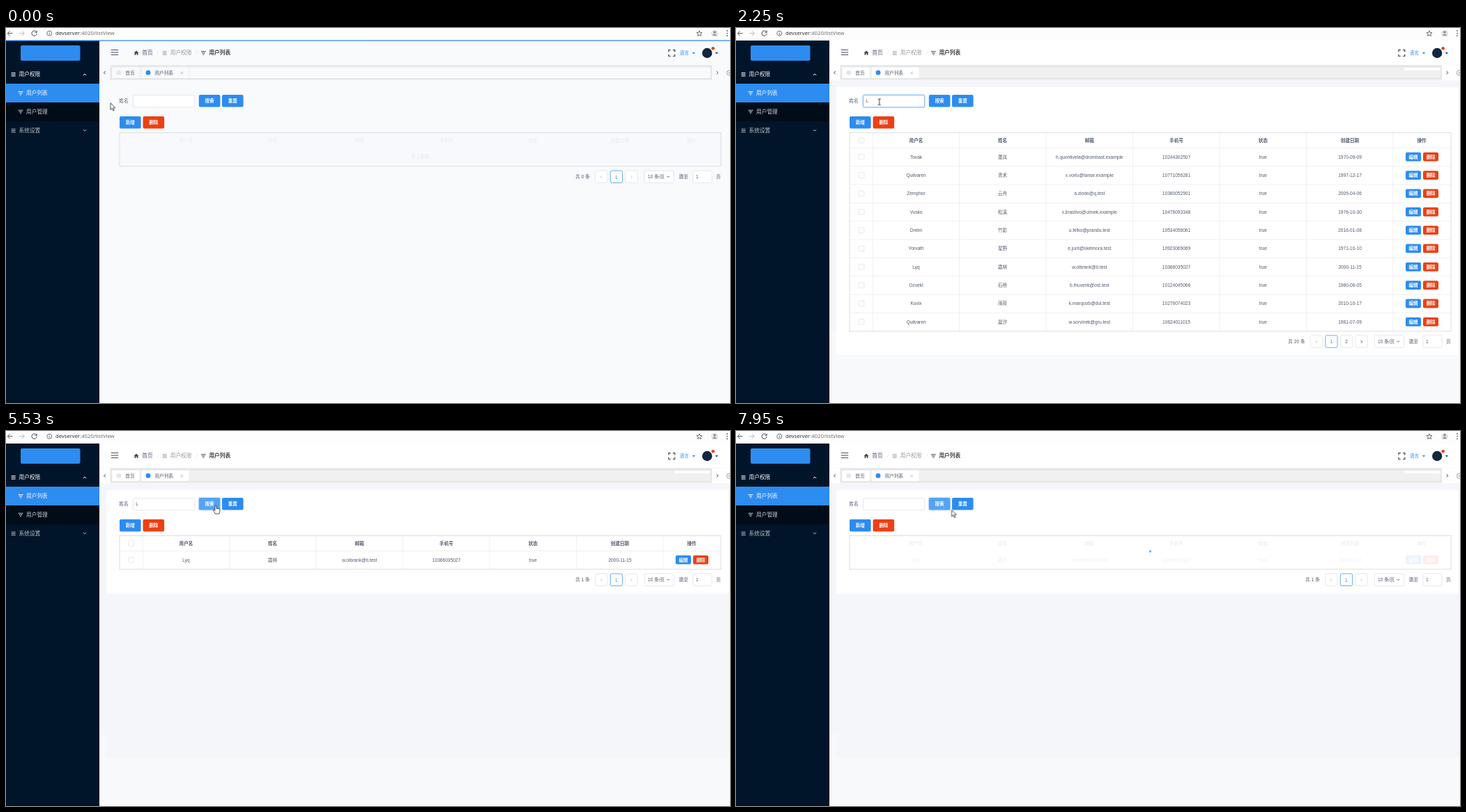
Write an HTML page that moves like this. It is 1039 by 539 pixels and loops after 8 s.

```html
<!DOCTYPE html>
<html lang="zh-CN">
<head>
<meta charset="utf-8">
<title>用户列表</title>
<style>
html, body { margin: 0; width: 100%; height: 100%; overflow: hidden; background: #fff; }
svg { display: block; width: 100%; height: 100%; }
text { font: 6.6px "Liberation Sans", "Noto Sans CJK SC", "Noto Sans CJK", sans-serif; fill: #515a6e; }
.mid { text-anchor: middle; }
.bold { font-weight: 700; }
.nav { font-size: 7.7px; }
.url { font: 7.7px "Open Sans", sans-serif; fill: #666; }
.pale { fill: #fff; }
.grid { fill: none; stroke: #e8eaec; stroke-width: .7; }
.box { fill: #fff; stroke: #dcdee2; stroke-width: .7; }
.frame { fill: none; stroke: #d7dade; stroke-width: .9; }
.ring { fill: none; stroke: #2d8cf0; stroke-opacity: .2; stroke-width: 1.2; }

/* every keyframe set below spans the same 8 s loop */
.empty, .full, .single, .typed, .caret1, .caret2, .patch, .strip, .dot1, .dot2, .arrow, .beam, .hand {
  animation: 8s step-end infinite;
}
.empty { animation-name: empty; }
.full { animation-name: full; }
.single { animation-name: single; }
.typed { animation-name: typed; }
.caret1 { animation-name: caret1; }
.caret2 { animation-name: caret2; }
.patch { animation-name: patch; }
.strip { animation-name: strip; }
.dot1 { animation-name: dot1; }
.dot2 { animation-name: dot2; }
.arrow { animation-name: arrow; }
.beam { animation-name: beam; }
.hand { animation-name: hand; }
@keyframes empty { 0% { visibility: visible } 3.375%, 100% { visibility: hidden } }
@keyframes full { 0%, 58%, 100% { visibility: hidden } 3.375% { visibility: visible } }
@keyframes single { 0% { visibility: hidden } 58%, 100% { visibility: visible } }
@keyframes typed { 0%, 83%, 100% { visibility: hidden } 21.125% { visibility: visible } }
@keyframes caret1 { 0%, 16.5%, 100% { visibility: hidden } 10.125% { visibility: visible } }
@keyframes caret2 { 0%, 28.125%, 39.875%, 100% { visibility: hidden } 21.125%, 34.75% { visibility: visible } }
@keyframes patch { 0%, 6.5%, 100% { visibility: hidden } 3.375% { visibility: visible } }
@keyframes strip { 0% { visibility: hidden } 3.375%, 100% { visibility: visible } }
@keyframes dot1 { 0%, 25%, 100% { visibility: hidden } 3.375% { visibility: visible } }
@keyframes dot2 { 0%, 58%, 100% { visibility: hidden } 25% { visibility: visible } }
@keyframes arrow {
  0%, 32.8%, 70.7%, 98.6%, 100% { visibility: visible }
  2.4%, 36.1%, 71.4% { visibility: hidden }
}
@keyframes beam { 0%, 32.8%, 100% { visibility: hidden } 2.4% { visibility: visible } }
@keyframes hand {
  0%, 70.7%, 98.6%, 100% { visibility: hidden }
  36.1%, 71.4% { visibility: visible }
}

.cursor, .mask, .bar, .search, .reset, .input, .ring { animation: 8s linear infinite; }
.cursor { animation-name: move; }
.mask { animation-name: mask; }
.bar { animation-name: bar; }
.search { animation-name: search; }
.reset { animation-name: reset; }
.input { animation-name: input; }
.ring.a { animation-name: inputRing; }
.ring.b { animation-name: searchRing; }
.ring.c { animation-name: resetRing; }
@keyframes move {
  0%, .6% { transform: translate(150px, 107.7px) }
  3.75% { transform: translate(205px, 105.7px) }
  28% { transform: translate(205px, 105.7px) }
  28.125%, 30% { transform: translate(205.7px, 106.2px) }
  32.5% { transform: translate(262px, 112px) }
  35% { transform: translate(311px, 117px) }
  37.875%, 58% { transform: translate(297px, 107.5px) }
  61.25%, 69.125% { transform: translate(301px, 107px); animation-timing-function: ease-in-out }
  78.5%, 86.25% { transform: translate(337.5px, 110px) }
  91.625%, 96.25% { transform: translate(298px, 109px) }
  99.1%, 100% { transform: translate(309.5px, 113.3px) }
}
@keyframes mask {
  0%, 3.375%, 47%, 58%, 98.25%, 100% { opacity: 1 }
  5.875%, 44.5%, 60.5%, 95.75% { opacity: 0 }
}
@keyframes bar { 0%, 1.125% { opacity: .8 } 3.375%, 100% { opacity: 0 } }
@keyframes search {
  0%, 36.1%, 73.2%, 90% { fill: #2d8cf0 }
  38.6%, 39.9%, 46.5%, 70.7%, 92%, 92.4%, 97.5%, 100% { fill: #57a3f3 }
  41.5%, 44.5%, 94%, 95.7% { fill: #2b85e4 }
}
@keyframes reset {
  0%, 71.4%, 92%, 100% { fill: #2d8cf0 }
  73.9%, 81%, 85.5%, 90% { fill: #57a3f3 }
  82.9%, 83.3% { fill: #2b85e4 }
}
@keyframes input {
  0%, 2.4%, 42.4%, 100% { stroke: #dcdee2 }
  4.6%, 39.9% { stroke: #57a3f3 }
}
@keyframes inputRing { 0%, 10%, 42.4%, 100% { opacity: 0 } 12.25%, 39.9% { opacity: 1 } }
@keyframes searchRing { 0%, 39.9%, 81.5%, 92.4% { opacity: 0 } 42.4%, 81%, 94.9%, 100% { opacity: 1 } }
@keyframes resetRing { 0%, 82%, 94.5%, 100% { opacity: 0 } 84.5%, 92.4% { opacity: 1 } }

.spin { fill: #2d8cf0; transform-box: fill-box; transform-origin: center; animation: bounce 1s ease-in-out infinite; }
@keyframes bounce { from { transform: scale(0) } to { transform: scale(1); opacity: 0 } }
</style>
</head>
<body>
<svg id="stage" viewBox="0 0 1039 539"></svg>
<script>
const BLUE = '#2d8cf0', RED = '#ed4014';
const LEFT = 163, TOP = 150.4, WIDTH = 863, HEAD = 22, ROW = 26.35;
const edges = [196.5, 320.5, 445, 569.5, 694, 818.5, 943];
const centers = [258.5, 382.5, 507.3, 632, 756.3, 881, 984];
const titles = ['用户名', '姓名', '邮箱', '手机号', '状态', '创建日期', '操作'];
const users = `Tovak|墨岚|h.quontivela@drombast.example|10244302507|1970-09-09
Quilvaren|青禾|x.vorlu@tanse.example|10771056281|1997-12-17
Zemphor|云舟|a.zindo@q.test|10380052901|2009-04-06
Vusko|松溪|x.brastivo@ulmek.example|10476093348|1976-10-30
Drelm|竹影|u.felko@prandu.test|10534058061|2016-01-08
Yorvath|星野|e.junt@skelmora.test|10923069069|1971-10-10
Lyq|霜林|w.olbrank@ti.test|10366035027|2000-11-15
Ozvekt|石桥|b.thuvenk@ost.test|10124045068|1980-06-05
Kuvix|雨荷|k.marquob@dul.test|10276074023|2010-10-17
Quilvaren|晨汐|w.sorvinek@gru.test|10624011015|1981-07-09`
  .split('\n').map(line => line.split('|'));

// markup helpers; text is placed by its vertical middle
const rect = (x, y, w, h, fill, r = 0, cls = '') =>
  `<rect x="${x}" y="${y}" width="${w}" height="${h}" rx="${r}" ${fill ? `fill="${fill}"` : ''} class="${cls}"/>`;
const text = (x, y, s, cls = '', fill = '') =>
  `<text x="${x}" y="${y + (cls.includes('nav') ? 2.8 : 2.4)}" class="${cls}" ${fill ? `style="fill:${fill}"` : ''}>${s}</text>`;
const path = (d, stroke = '#515a6e', w = .9, fill = 'none') =>
  `<path d="${d}" fill="${fill}" stroke="${stroke}" stroke-width="${w}"/>`;
const circle = (x, y, r, fill, extra = '') => `<circle cx="${x}" cy="${y}" r="${r}" fill="${fill}" ${extra}/>`;
const group = (cls, ...parts) => `<g class="${cls}">${parts.join('')}</g>`;
const button = (x, y, w, h, label, fill, cls = '') =>
  rect(x, y, w, h, fill, 2, cls) + text(x + w / 2, y + h / 2, label, 'mid bold pale');
const bars = (x, y, widths, color) =>
  widths.map((w, i) => path(`M${x - w / 2} ${y + (i - 1) * 2.2}h${w}`, color, 1)).join('');
const menuIcon = (x, y, c) => bars(x, y, [6, 6, 6], c);
const filterIcon = (x, y, c) => bars(x, y, [7, 4.6, 2], c);
// chevron pointing along (dx, dy)
const chevron = (x, y, dx, dy, c, s = 2.2) =>
  path(`M${x - dx * s / 2 - dy * s} ${y - dy * s / 2 - dx * s}L${x + dx * s / 2} ${y + dy * s / 2}L${x - dx * s / 2 + dy * s} ${y - dy * s / 2 + dx * s}`, c, 1);
const caretDown = (x, y, c) => path(`M${x - 2.3} ${y - 1}h4.6l-2.3 2.4z`, 'none', 0, c);

function browser() {
  return rect(0, 0, 1039, 18, '#fdfdfd') +
    path('M9.5 7.7H2.3M5.6 4.3L2.2 7.7L5.6 11.1', '#555', 1) +
    path('M19 7.7H26.2M22.9 4.3L26.3 7.7L22.9 11.1', '#bbb', 1) +
    path('M43.5 5.5A3.6 3.6 0 1 0 44.2 8M44.2 3.8V6.4H41.6', '#444', 1) +
    circle(62.3, 7.7, 3.5, 'none', 'stroke="#555" stroke-width=".8"') +
    path('M62.3 7.2V9.7M62.3 5.5V6.4', '#555', .9) +
    '<text x="71" y="10.4" class="url"><tspan fill="#222">devserver</tspan>:4020/listView</text>' +
    path('M995 3.9l1.1 2.6 2.8.2-2.1 1.9.6 2.8-2.4-1.5-2.4 1.5.6-2.8-2.1-1.9 2.8-.2z', '#444', .8) +
    circle(1017, 7.6, 5.2, '#e4e6e8') + circle(1017, 6, 1.8, '#888') +
    path('M1013.6 10.8q3.4-4 6.8 0z', 'none', 0, '#888') +
    [4, 7.6, 11.2].map(y => circle(1035, y, .9, '#555')).join('');
}

function sidebar() {
  return rect(0, 18, 134, 521, '#001529') + rect(21, 25, 85.5, 22, BLUE, 2) +
    menuIcon(10.6, 66.8, '#fff') + text(18.5, 66.5, '用户权限', 'nav', '#fff') + chevron(113, 67, 0, -1, '#fff') +
    rect(0, 80, 134, 27, BLUE) + filterIcon(21, 93.7, '#fff') + text(29, 93.4, '用户列表', 'nav', '#fff') +
    rect(0, 107, 134, 27, '#000c17') + filterIcon(21, 120.5, '#ccd0d4') + text(29, 120.2, '用户管理', 'nav', '#ccd0d4') +
    menuIcon(10.6, 147.5, '#b3b9bf') + text(18.5, 147.2, '系统设置', 'nav', '#b3b9bf') + chevron(113, 147, 0, 1, '#b3b9bf');
}

function surfaces() {
  return rect(134, 18, 905, 521, '#f8f9fb') + rect(134, 75, 905, 361, '#f5f6f9') +
    rect(144, 436, 895, 34, '#f5f6f9') + rect(134, 18, 905, 57, '#fff') + path('M134 53.3H1039', '#eef0f2', .6) +
    group('full', rect(144, 85, 893, 385, '#fff', 3)) + group('single', rect(144, 85, 893, 149, '#fff', 3)) +
    group('patch', rect(959, 75, 67, 20, '#fcfcfd')) + group('empty', rect(134, 18, 905, 521, '#f8fafc'));
}

function header() {
  return [31.5, 35, 38.5].map(y => path(`M150.7 ${y}h10.5`, '#515a6e', 1.1)).join('') +
    path('M183.6 36L187 32.6L190.4 36H189.4V39H187.8V36.8H186.2V39H184.6V36z', 'none', 0, '#444') +
    text(195.3, 35.4, '首页', 'nav') + text(217, 35.4, '/', 'nav', '#dcdee2') +
    menuIcon(227.7, 36, '#999') + text(235.7, 35.4, '用户权限', 'nav', '#999') + text(273, 35.4, '/', 'nav', '#dcdee2') +
    filterIcon(283.3, 36, '#444') + text(291.4, 35.4, '用户列表', 'nav bold', '#444') +
    path('M951 34.5V31.7H953.8M957 31.7H959.8V34.5M959.8 37.7V40.5H957M953.8 40.5H951V37.7', '#444', 1.2) +
    text(967, 35.4, '语言', '', BLUE) + caretDown(987, 36, BLUE) +
    circle(1006.2, 36, 7.2, '#12263f') + circle(1014.7, 29.2, 2.3, RED) + caretDown(1019.8, 36, '#2b4a6f');
}

function tabs() {
  return rect(149.5, 53.5, 863.5, 21, '#e5e6e7') + rect(152, 56.5, 859, 15.5, '#f0f0ef') +
    rect(152.5, 56.5, 39, 15.5, '#fff', 1) + rect(195, 56.5, 67.5, 15.5, '#fff', 1) +
    group('patch', rect(959, 57, 52, 15, '#fafafa')) + group('strip', rect(959, 57, 52, 4, '#fdfdfd')) +
    group('empty', rect(152, 56.5, 859, 15.5, '#f8fafc'), path('M192 56.5V72M194.3 56.5V72M263 56.5V72', '#e5e7ea', .8)) +
    circle(161.8, 64.2, 3.4, '#e4e6e8') + text(171.3, 64.2, '首页') +
    circle(204, 64.2, 3.4, BLUE) + text(213.5, 64.2, '用户列表') +
    path('M250.4 62.8l3.6 3.6m0-3.6l-3.6 3.6', '#aaa', .7) +
    chevron(141.6, 64.2, -1, 0, '#444') + chevron(1020.8, 64.2, 1, 0, '#444') +
    circle(1038, 64.5, 3.6, 'none', 'stroke="#777" stroke-width=".7"') + path('M1036.8 63.3l2.4 2.4m0-2.4l-2.4 2.4', '#777', .7);
}

function form() {
  return text(162.3, 104.5, '姓名') +
    rect(182.5, 96.6, 88, 17.2, '', 2, 'box input') + rect(181.6, 95.7, 89.8, 19, '', 2.6, 'ring a') +
    group('typed', text(186.3, 105, 'L')) +
    group('caret1', rect(186, 101, .8, 8, '#333')) + group('caret2', rect(190.2, 101, .8, 8, '#333')) +
    button(276.8, 96, 30.6, 17.6, '搜索', BLUE, 'search') + rect(276.2, 95.4, 31.8, 18.8, '', 2.5, 'ring b') +
    button(310, 96, 30.6, 17.6, '重置', BLUE, 'reset') + rect(309.4, 95.4, 31.8, 18.8, '', 2.5, 'ring c') +
    button(163, 127, 30.6, 17.6, '新增', BLUE) + button(196.5, 127, 30.6, 17.6, '删除', RED);
}

const checkbox = y => rect(176.2, y - 3.8, 7.6, 7.6, '', 1, 'box');

function row(user, i) {
  const y = TOP + HEAD + ROW * (i + .5) - .4;
  const [name, alias, mail, phone, date] = user;
  return checkbox(y) +
    [name, alias, mail, phone, 'true', date].map((s, c) => text(centers[c], y, s, 'mid')).join('') +
    button(961, y - 6.4, 22, 12.8, '编辑', BLUE) + button(986, y - 6.4, 22, 12.8, '删除', RED) +
    path(`M${LEFT} ${TOP + HEAD + ROW * i}h${WIDTH}`, '#e8eaec', .7);
}

const tableHeight = count => HEAD + ROW * count;

function table(list) {
  const grid = edges.map(x => `M${x} ${TOP}v${tableHeight(list.length)}`).join('');
  return checkbox(161.5) + titles.map((s, i) => text(centers[i], 161.3, s, 'mid bold')).join('') +
    `<path class="grid" d="${grid}"/>` + list.map(row).join('');
}

const emptyTable = titles.map((s, i) => text(centers[i], 161.3, s, 'mid')).join('') + text(594.5, 185, '暂无数据', 'mid');
const veil = (count, fill) => `<g opacity=".9">${rect(LEFT, TOP, WIDTH, tableHeight(count), fill)}</g>`;
const frame = count => rect(LEFT, TOP, WIDTH, tableHeight(count), '', 0, 'frame');
const spinner = (y, delay) => circle(594.5, y, 8.8, BLUE, `class="spin" style="animation-delay:${delay}ms"`);

function pager(y, total, pages) {
  const first = pages > 1 ? 824.3 : 845.7;
  const cell = (i, on) => rect(first + i * 21.6, y - 8.7, 17.2, 17.4, '', 2, 'box')
    .replace('/>', on ? ` style="stroke:${BLUE}"/>` : '/>');
  const mid = i => first + i * 21.6 + 8.6;
  let out = text(pages > 1 ? 792.3 : 817.3, y, `共 ${total} 条`) + cell(0) + chevron(mid(0), y + .4, -1, 0, '#c5c8ce', 1.8);
  for (let p = 1; p <= pages; p++) out += cell(p, p === 1) + text(mid(p), y + .4, p, 'mid', p === 1 ? BLUE : '');
  return out + cell(pages + 1) + chevron(mid(pages + 1), y + .4, 1, 0, pages > 1 ? '#515a6e' : '#c5c8ce', 1.8) +
    rect(916.2, y - 8.7, 42.4, 17.4, '', 2, 'box') + text(921, y, '10 条/页') + chevron(950.3, y, 0, 1, '#666', 1.8) +
    text(966, y, '跳至') + rect(985.8, y - 8.7, 27.3, 17.4, '', 2, 'box') + text(990, y, '1') + text(1019, y, '页');
}

const cursor = group('cursor',
  group('arrow', path('M0 0V9.6L2.2 7.6L3.8 11.2L5.4 10.5L3.8 7H6.8z', '#222', .8, '#fff')),
  group('beam', path('M-2-4.3H-.5L0-3.8L.5-4.3H2M0-4V4M-2 4.3H-.5L0 3.8L.5 4.3H2', '#222', .9)),
  group('hand', path('M-1.1 1Q-1.1 0 0 0T1.1 1V4.4Q5.4 4 5.9 6.2V8.6Q5.8 10.2 5 12H-.6Q-1.6 9.8-3.6 7.4Q-3.4 5.4-1.1 7.4z', '#222', .8, '#fff')));

const oneUser = [users[6]];
document.getElementById('stage').innerHTML =
  browser() + surfaces() + sidebar() + group('bar', rect(0, 17.3, 1039, 1.6, BLUE)) + header() + tabs() + form() +
  group('empty', emptyTable, veil(1, '#f8fafc'), frame(1), pager(213.8, 0, 1)) +
  group('full', table(users)) + group('single', table(oneUser)) +
  group('mask', group('full', veil(10, '#fff')), group('single', veil(1, '#fff')),
    group('dot1', spinner(291.5, -880)), group('dot2', spinner(291.5, -440)), group('single', spinner(173, -340))) +
  group('full', frame(10), pager(450.6, 20, 2)) + group('single', frame(1), pager(213.8, 1, 1)) + cursor;
</script>
</body>
</html>
```
